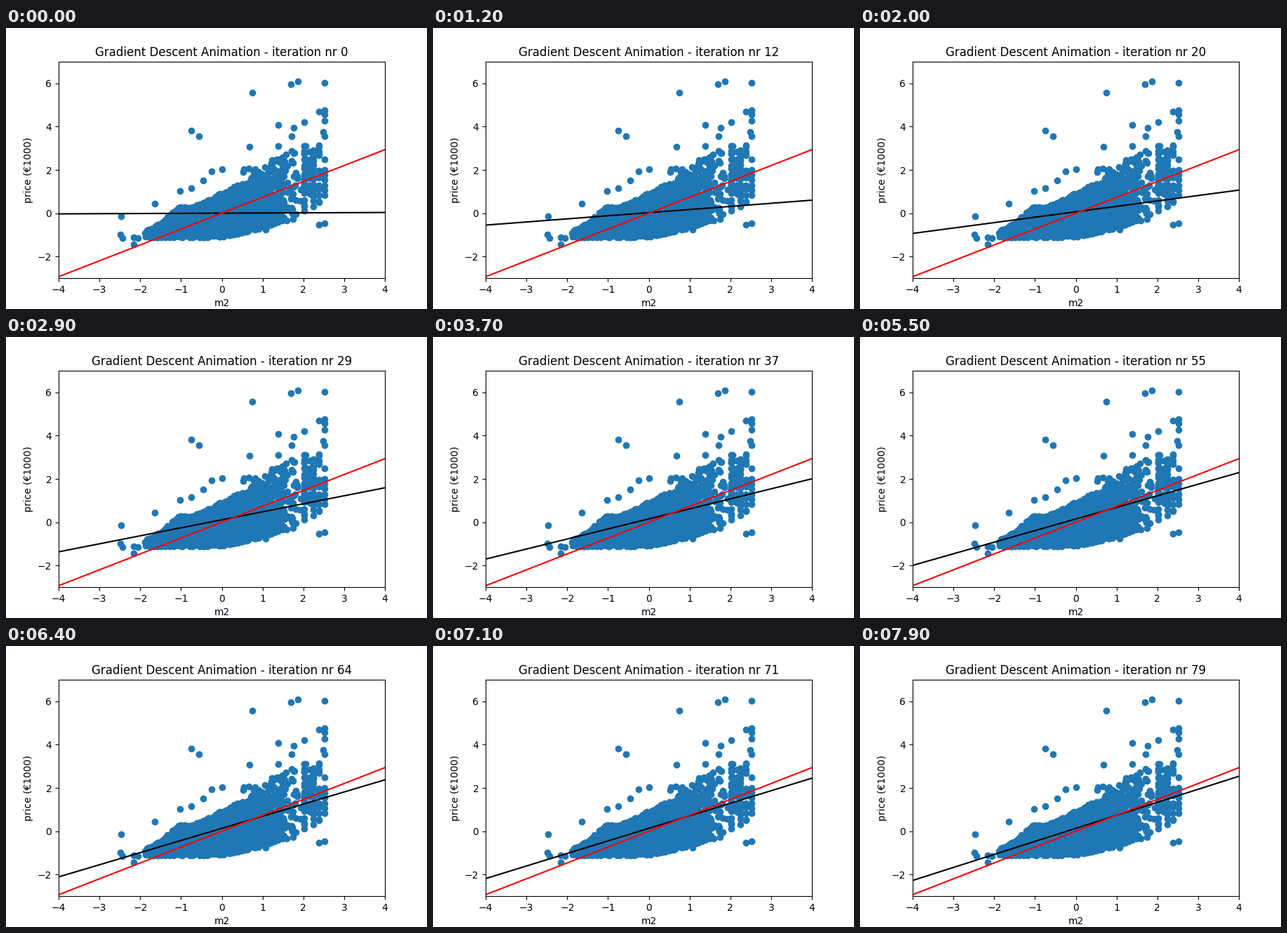
Recreate the animation shown at these times as a matplotlib script. Size 600x400 px, loop 8000 ms.

```python
import numpy as np
import matplotlib.pyplot as plt
from matplotlib.animation import FuncAnimation

FRAMES, INTERVAL = 80, 100
rng = np.random.default_rng(7)


def low(x):
    """Lower edge of the cloud: flat, then rising."""
    return -1.13 + 0.45 * np.maximum(x, 0)


def high(x):
    """Upper edge of the cloud: a slope with a small bump on the left."""
    return 0.95 + 0.95 * x + 0.35 * np.exp(-((x + 1.1) / 0.28) ** 2)


def make_points():
    outliers = np.array([
        (0.75, 5.57), (1.69, 5.96), (1.87, 6.09), (2.52, 6.03), (-0.75, 3.82),
        (-0.56, 3.56), (1.38, 4.08), (1.76, 3.95), (2.03, 4.20), (2.38, 4.70),
        (2.52, 4.75), (2.52, 4.55), (2.52, 4.27), (2.49, 3.75), (2.52, 3.56),
        (0.68, 3.07), (1.71, 3.56), (-2.47, -0.14), (-1.65, 0.44), (-2.48, -0.99),
        (-2.43, -1.15), (-2.16, -1.12), (-2.06, -1.15), (-2.16, -1.44),
        (-1.02, 1.03), (-0.75, 1.16), (-0.46, 1.51), (-0.25, 1.94), (0.01, 2.03),
        (2.38, -0.53), (2.52, -0.47), (1.08, -0.76), (2.52, 2.48),
    ])
    # Dense body, thinning to the right
    bx = np.concatenate([rng.triangular(-1.88, 0, 2.0, 1400),
                         rng.uniform(-1.88, -0.8, 150)])
    by = low(bx) + (high(bx) - low(bx)) * rng.beta(1, 1.15, bx.size)
    # Stragglers above the body
    sx = rng.uniform(0.5, 1.8, 28)
    sy = high(sx) + rng.exponential(0.3, sx.size)
    # Vertical stacks on the right
    cx = rng.choice([2.02, 2.02, 2.05, 2.16, 2.25, 2.25, 2.38], 95)
    cy = rng.triangular(-0.1, 1.3, 3.6, cx.size)
    ey = np.linspace(0.83, 2.0, 6)
    ex = np.full(ey.size, 2.52)
    return np.vstack([outliers, *(np.column_stack(p) for p in
                                  [(bx, by), (sx, sy), (cx, cy), (ex, ey)])])


def fit_line(i):
    """Slope and intercept: steady climb, then slow settling."""
    slope = np.interp(i, [0, 12, 29, 44, 55, 79], [.008, .144, .37, .546, .536, .602])
    offset = np.interp(i, [0, 12, 44, 60, 79], [0, .025, .185, .13, .13])
    return slope, offset


fig, ax = plt.subplots(figsize=(6, 4), dpi=100)
ax.set(xlim=(-4, 4), ylim=(-3, 7), xlabel="m2", ylabel="price (€1000)")
ax.scatter(*make_points().T)

ends = np.array([-4, 4])
fit, = ax.plot(ends, 0 * ends, color="black")
ax.plot(ends, 0.734 * ends, color="red")
title = ax.set_title("")


def update(i):
    slope, offset = fit_line(i)
    fit.set_ydata(slope * ends + offset)
    title.set_text(f"Gradient Descent Animation - iteration nr {i}")
    return fit, title


anim = FuncAnimation(fig, update, frames=FRAMES, interval=INTERVAL, repeat=True)
plt.show()
```
